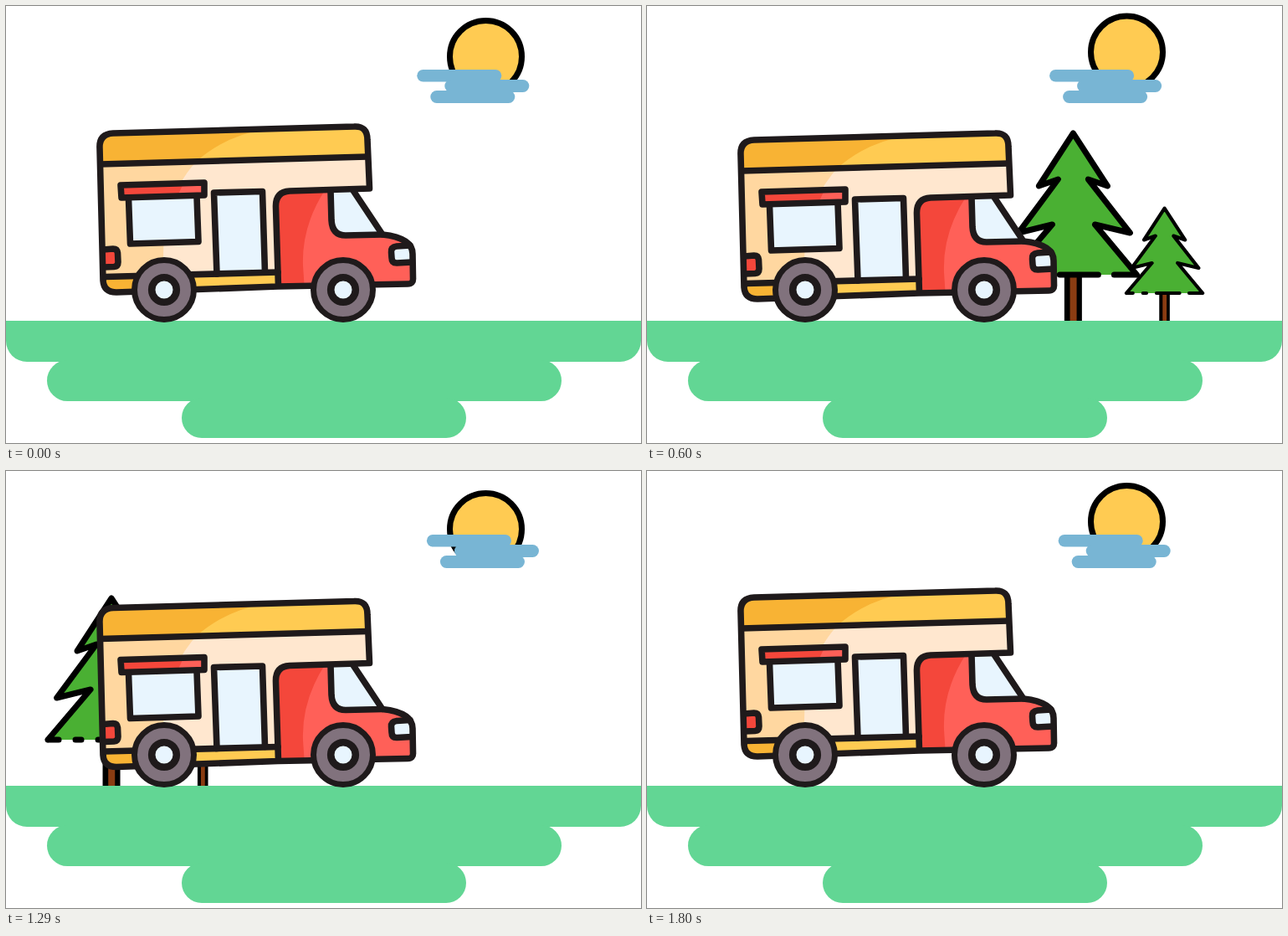
Animation, 759 px wide and 522 px high, one loop 1830 ms. Source, as an HTML page:

```html
<!DOCTYPE html>
<html lang="en">
<head>
<meta charset="utf-8">
<title>Camper ride</title>
<style>
  html, body { margin: 0; width: 100%; height: 100%; overflow: hidden; background: #fff; }
  svg { display: block; width: 759px; height: 522px; }
  .ink { fill: none; stroke: #1f1a1b; stroke-width: 7.6; stroke-linecap: round; stroke-linejoin: round; }
  .glass { fill: #e8f5fe; }
  .amber { fill: #f8b334; }
  .yellow { fill: #ffcb52; }
  .red { fill: #f4473b; }
  .coral { fill: #ff6058; }
</style>
</head>
<body>
<svg viewBox="0 0 759 522">
  <defs>
    <!-- origin: foot of the trunk -->
    <g id="tree">
      <path d="M-10.5 -55H10.5V0H-10.5Z"/>
      <path d="M-3.8 -55H4.2V0H-3.8Z" fill="#8a3c12"/>
      <path d="M0 -224L41.500 -161L18 -169L68 -105L26 -115L76 -55H-76L-26 -115L-66 -105L-18 -169L-41.500 -161Z" fill="#4ab033"/>
      <path d="M-76 -55L-25 -115L-65.500 -105L-18 -169L-41 -161L0 -224L41 -161L18 -169L68 -105L26 -115L76 -55M-76 -55H-63M-43 -55H-36M-16 -55H30M49 -55H76"
        fill="none" stroke="#000" stroke-width="7" stroke-linecap="round" stroke-linejoin="round"/>
    </g>
    <g id="wheel">
      <circle r="35.500" fill="#81727d" stroke="#1f1a1b" stroke-width="7"/>
      <circle r="14.800" class="glass" stroke="#1f1a1b" stroke-width="8.600"/>
    </g>
    <clipPath id="shell">
      <path d="M116 328L112 170Q111 153 128 152L416 144Q432 143 432 160L434.500 218L338 221L326 336L132 342Q117 343 116 328Z"/>
    </clipPath>
    <clipPath id="cabShape">
      <path d="M327 332L322 240Q322 222 339 221L414 219L450 274Q486 278 486 296L487 325Q487 332 480 332Z"/>
    </clipPath>
  </defs>

  <g id="sun"><circle cx="573.500" cy="46.500" r="43" fill="#ffcb52" stroke="#000" stroke-width="7"/></g>
  <g id="cloud" fill="#78b5d4">
    <rect x="0" y="76" width="101" height="14.500" rx="7.250"/>
    <rect x="33" y="88" width="101" height="15" rx="7.500"/>
    <rect x="16" y="101" width="101" height="15" rx="7.500"/>
  </g>

  <g id="trees">
    <use href="#tree"/>
    <use href="#tree" transform="translate(109.200) scale(.6)"/>
  </g>

  <g fill="#62d694">
    <path d="M0 376H759V400A25 25 0 0 1 734 425H25A25 25 0 0 1 0 400Z"/>
    <rect x="49" y="423" width="615" height="49" rx="24.500"/>
    <rect x="210" y="468" width="340" height="48" rx="24"/>
  </g>

  <g id="body">
    <g clip-path="url(#shell)">
      <path d="M100 130H450V350H100Z" fill="#ffe7cf"/>
      <path d="M100 130H310V148Q250 160 222 192Q188 234 188 300V350H100Z" fill="#ffd7a0"/>
      <path d="M100 130H450V180L100 189Z" class="yellow"/>
      <path d="M100 130H310V147Q262 155 227 186L100 189Z" class="amber"/>
      <path d="M100 323L340 318V350H100Z" class="yellow"/>
      <path d="M100 323L188 321V350H100Z" class="amber"/>
    </g>
    <g clip-path="url(#cabShape)">
      <path d="M315 210H495V340H315Z" class="coral"/>
      <path d="M315 210H388Q353 258 355 310L357 340H315Z" class="red"/>
    </g>
    <path d="M388 221L389 256Q390 274 406 274L449 273L414 219Z" class="glass"/>
    <path d="M137 214L237 211V226L138 229Z" class="red"/>
    <path d="M212 212L237 211V226L205 227Z" class="coral"/>
    <path d="M146.500 230L148.500 284L230 281.500L228 227Z" class="glass"/>
    <path d="M248.500 223L306.500 221.500L309.500 318L252 320Z" class="glass"/>
    <path d="M115 291L128 290Q133 290 133.500 295L134 306Q134 311 129 311.500L116 312Z" class="red"/>
    <path d="M484 286L467 287Q460 288 460.500 294L461 301Q461 307 467 307L486 306Z" class="glass"/>
    <g class="ink">
      <path d="M325 335L132 342Q117 342 116 328L112 170Q111 153 128 152L416 144Q432 143 432 160L434.500 218L339 221Q322 222 322.500 240L325.500 335L480 332Q487 332 486.500 325L486 296Q486 277 450 273L414 219"/>
      <path d="M113 189L432 180M118 323.500L325 318"/>
      <path d="M388 221L389 256Q390 274 406 274L450 273"/>
      <path d="M137 214L237 211V226L138 229Z"/>
      <path d="M146.500 230L148.500 284L230 281.500L228 227"/>
      <path d="M248.500 223L306.500 221.500L309.500 318M248.500 223L252 320"/>
      <path d="M116 291L128 290Q133 290 133.500 295L134 306Q134 311 129 311.500L117 312"/>
      <path d="M483 286L467 287Q460 288 460.500 294L461 301Q461 307 467 307L485 306"/>
    </g>
  </g>
  <use href="#wheel" x="189" y="339"/>
  <use href="#wheel" x="403" y="339"/>
</svg>
<script>
  const LOOP = 1830, STEP = 30;
  const part = id => document.getElementById(id);
  const sun = part('sun'), cloud = part('cloud'), trees = part('trees'), body = part('body');

  // [time, value] pairs with straight runs between them
  const sunY = [[0, 14], [495, 6], [1226, 24.1], [1800, 14]];
  const cloudX = [[0, 491.3], [540, 478.7], [1197, 505], [1800, 491.7]];
  const treeX = [[0, 842.7], [1800, -157.3]];

  // The body bounces between two heights every 180 ms
  const bounce = Array.from({ length: 11 }, (_, i) => [i * 180, i % 2 ? 15 : -6]);
  bounce[0][1] = 0;
  bounce[10][1] = -1;

  function at(track, t) {
    const i = track.findIndex(([time]) => time > t);
    if (i < 0) return track[track.length - 1][1];
    const [t0, a] = track[i - 1], [t1, b] = track[i];
    return a + (b - a) * (t - t0) / (t1 - t0);
  }

  const move = (el, x, y) => el.setAttribute('transform', `translate(${x} ${y})`);

  function draw(t) {
    move(sun, 0, at(sunY, t));
    move(cloud, at(cloudX, t), 0);
    move(trees, at(treeX, t), 376);
    move(body, 0, at(bounce, t));
  }

  const start = performance.now();
  function tick() {
    const t = (performance.now() - start) % LOOP;
    draw(Math.floor(t / STEP) * STEP);
    requestAnimationFrame(tick);
  }
  tick();
</script>
</body>
</html>
```
